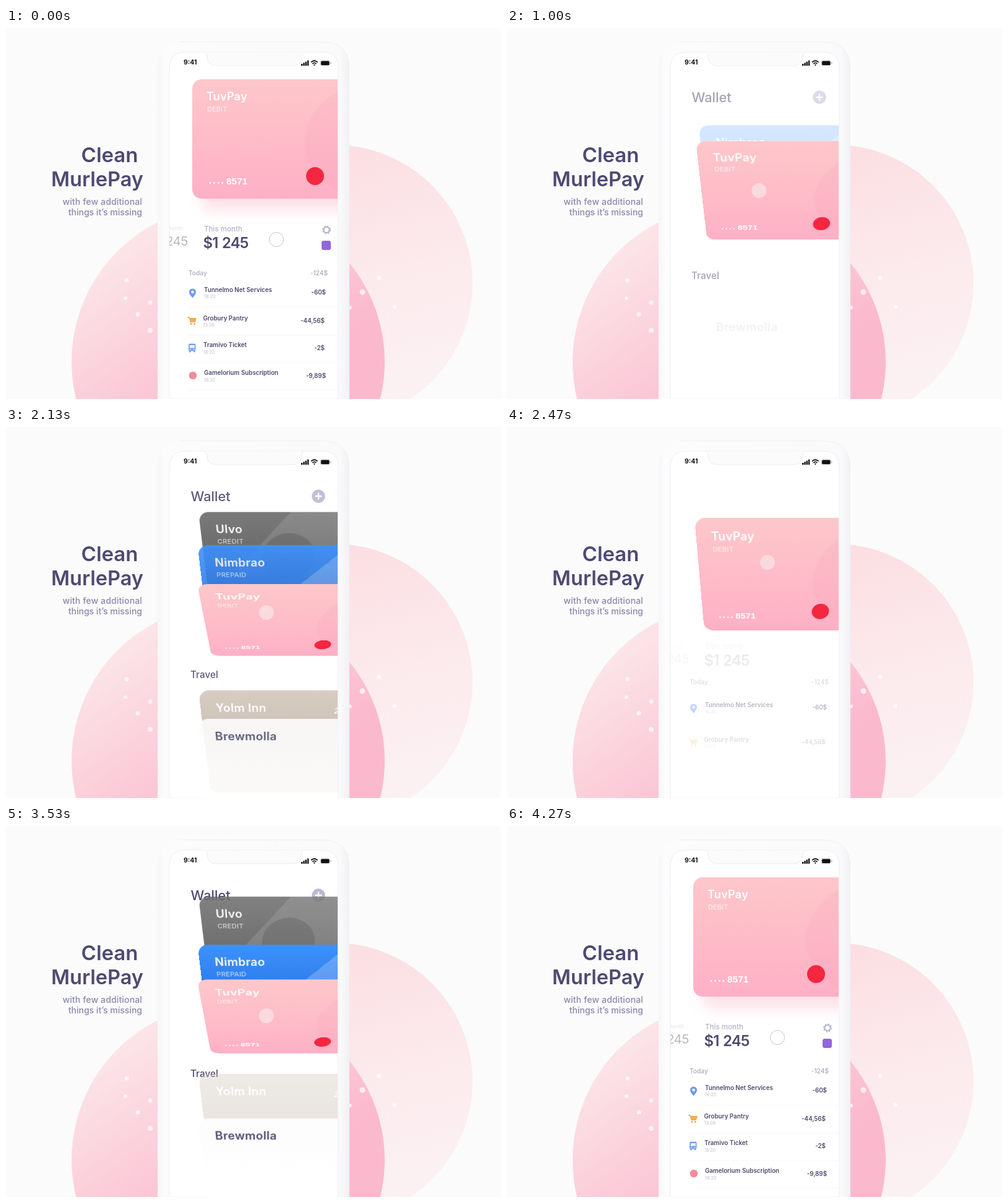
Animation of 800x600 px, one loop 4310 ms. Source, as an HTML page:

```html
<!DOCTYPE html>
<html lang="en">
<head>
<meta charset="utf-8">
<title>Wallet</title>
<style>
html, body { margin: 0; width: 100%; height: 100%; overflow: hidden; background: #fbfbfb; }
#stage { position: absolute; left: 0; top: 0; width: 800px; height: 600px; overflow: hidden; font-family: Inter, "Open Sans", sans-serif; }
#stage svg { position: absolute; left: 0; top: 0; overflow: visible; }
#screen { position: absolute; left: 264px; top: 39px; width: 272px; height: 561px; overflow: hidden; border-radius: 26px 26px 0 0; }
#ui { position: absolute; left: -264px; top: -39px; width: 800px; height: 600px; }
.text { position: absolute; line-height: 0; white-space: pre; }
.item { position: absolute; left: 0; top: 0; width: 800px; height: 600px; }
.card { position: absolute; left: 0; top: 0; width: 306px; height: 193px; border-radius: 15px; transform-origin: 0 0; overflow: hidden; }
.shadow { position: absolute; left: 317px; top: 200px; width: 290px; height: 76px; border-radius: 15px; box-shadow: 0 20px 22px rgba(250, 185, 202, .42); }
#pointer { position: absolute; left: -12px; top: -12px; width: 24px; height: 24px; border-radius: 50%; box-sizing: border-box; }
</style>
</head>
<body>
<div id="stage">
  <svg width="800" height="600">
    <defs>
      <linearGradient id="far" x1=".35" y1="0" x2=".6" y2="1">
        <stop offset="0" stop-color="#fbdde1"/><stop offset=".55" stop-color="#fcebed"/><stop offset="1" stop-color="#fbf2f4"/>
      </linearGradient>
      <linearGradient id="near" gradientUnits="userSpaceOnUse" x1="180" y1="350" x2="370" y2="620">
        <stop offset="0" stop-color="#fbe6e8"/><stop offset="1" stop-color="#fbb9cd"/>
      </linearGradient>
      <linearGradient id="body" x1="0" y1="0" x2="1" y2="0">
        <stop offset="0" stop-color="#f6f6f8"/><stop offset=".03" stop-color="#fcfcfd"/>
        <stop offset=".95" stop-color="#fafafb"/><stop offset="1" stop-color="#f1f1f4"/>
      </linearGradient>
    </defs>
    <circle cx="530" cy="413" r="224" fill="url(#far)"/>
    <circle cx="359" cy="540" r="253" fill="url(#near)"/>
    <g fill="#fff" fill-opacity=".7">
      <circle cx="576" cy="427" r="4.5"/><circle cx="233" cy="489" r="4"/><circle cx="213" cy="463" r="3.5"/>
      <circle cx="195" cy="408" r="3.5"/><circle cx="233" cy="444" r="3.5"/><circle cx="193" cy="437" r="3"/>
      <circle cx="556" cy="452" r="3"/><circle cx="603" cy="404" r="3.5"/><circle cx="628" cy="451" r="3"/>
    </g>
    <path d="M245 600V66Q245 22 289 22H511Q555 22 555 66V600Z" fill="url(#body)"/>
    <path d="M280 22.5H511Q554.5 22.5 554.5 66V600" fill="none" stroke="#f1f1f4"/>
    <path d="M264 600V65Q264 39 290 39H511Q537 39 537 65V600Z" fill="#fff" stroke="#eeeef1"/>
  </svg>
  <div id="screen"><div id="ui"></div></div>
  <svg width="800" height="600">
    <path d="M318 39Q325 39 325 46Q325 61 341 61H462Q478 61 478 46Q478 39 485 39Z" fill="#fbfbfc"/>
    <path d="M320 39.5Q325 40 325 46Q325 61 341 61H462Q478 61 478 46Q478 40 483 39.5" fill="none" stroke="#ededf0"/>
    <path d="M477 58h2.4v3h-2.4zM480.3 56.3h2.4v4.7h-2.4zM483.6 54.4h2.4v6.6h-2.4zM486.9 52.4h2.4v8.6h-2.4z" fill="#111"/>
    <g fill="none" stroke="#111" stroke-width="1.7">
      <path d="M493 55.4Q498.3 50.6 503.6 55.4M495.2 57.8Q498.3 55 501.4 57.8"/>
    </g>
    <path d="M496.7 59.3Q498.3 58 499.9 59.3L498.3 61.3Z" fill="#111"/>
    <rect x="508" y="52.5" width="15.5" height="8.5" rx="2.4" fill="#bbb"/>
    <rect x="509.2" y="53.6" width="13.2" height="6.3" rx="1.5" fill="#111"/>
    <rect x="524.2" y="55" width="1.2" height="3.4" rx=".6" fill="#aaa"/>
  </svg>
</div>
<script>
const $ = id => document.getElementById(id);
const stage = $('stage'), ui = $('ui');
const INK = '#4c4a6c', SOFT = '#a9a8bd', LOOP = 4310;

function add(parent, cls, css = {}, html = '') {
  const el = document.createElement('div');
  el.className = cls;
  el.innerHTML = html;
  Object.assign(el.style, css);
  parent.appendChild(el);
  return el;
}

// y is the middle of the capitals; align 'right' makes x the right end
function text(parent, str, x, y, size, weight, color, align, extra = {}) {
  const side = align === 'right' ? { right: parent.dataset.w - x + 'px' } : { left: x + 'px' };
  const el = add(parent, 'text', {
    top: y + 'px', fontSize: size + 'px', fontWeight: weight, color, ...side, ...extra
  });
  el.textContent = str;
}

function item(parent = ui) {
  const el = add(parent, 'item');
  el.dataset.w = 800;
  return el;
}

const svg = (el, inner) => el.insertAdjacentHTML('beforeend', `<svg width="800" height="600">${inner}</svg>`);

// Headline and clock
stage.dataset.w = 800;
text(stage, 'Clean', 213.5, 205, 33, 600, '#4d4a72', 'right');
text(stage, 'MurlePay', 222, 245, 32.5, 600, '#4d4a72', 'right');
text(stage, 'with few additional', 220, 281, 14, 500, '#8a88ad', 'right', { letterSpacing: '.15px' });
text(stage, 'things it’s missing', 220, 298, 14, 500, '#8a88ad', 'right');
text(stage, '9:41', 287, 56, 10.5, 700, '#111');

// Detail list
const month = item();
text(month, 'This month', 320, 324.5, 11.6, 500, '#b3b2c6');
text(month, '$1 245', 318.5, 347.5, 24, 600, INK, 'left', { letterSpacing: '-.9px', wordSpacing: '1.5px' });
text(month, '$1 245', 294, 345, 20.5, 400, '#b9b9c3', 'right', { letterSpacing: '-.5px' });
text(month, 'Last month', 286, 324, 9, 400, '#e2e2e8', 'right');

const tools = item();
svg(tools, `<circle cx="518" cy="326.5" r="4.6" fill="none" stroke="#b9b8cf" stroke-width="2.4"/>
  <circle cx="518" cy="326.5" r="6.2" fill="none" stroke="#b9b8cf" stroke-width="1.8" stroke-dasharray="2.43 2.43"/>
  <rect x="510" y="344" width="15" height="15" rx="3.5" fill="#9366da"/>`);

const today = item();
text(today, 'Today', 295, 395.5, 10.2, 500, SOFT);
text(today, '-124$', 520, 395.5, 10.2, 500, SOFT, 'right');

const icons = [
  `<path d="M301.5 436.5C298 432 296 430 296 427A5.5 5.5 0 0 1 307 427C307 430 305 432 301.5 436.5Z" fill="#6c97ee"/>
   <circle cx="301.5" cy="427" r="2.4" fill="#e8f0ff"/>`,
  `<path d="M293.5 467.5H296L298 475.5H305.5L307.3 469.5H296.5Z" fill="#f8ae4c" stroke="#f3a23c" stroke-linejoin="round"/>
   <circle cx="299" cy="478.6" r="1.4" fill="#e99b3e"/><circle cx="304.5" cy="478.6" r="1.4" fill="#e99b3e"/>`,
  `<rect x="295" y="510.5" width="11.5" height="12" rx="2" fill="#78a2f2"/><rect x="296.8" y="513" width="8" height="4.5" fill="#edf4ff"/>
   <path d="M296 522.5h2.4v1.8H296zM303.2 522.5h2.4v1.8h-2.4z" fill="#5f86d8"/>
   <path d="M297 520h2M302.6 520h2" stroke="#fff"/>`,
  `<circle cx="302" cy="562" r="6.3" fill="#f28c98"/>`
];
const rows = [
  ['Tunnelmo Net Services', '18:20', '-60$', 320, 424, 435, 428, 517],
  ['Grobury Pantry', '13:09', '-44,56$', 318.5, 469.5, 481, 474, 515],
  ['Tramivo Ticket', '18:20', '-2$', 319, 513, 524.5, 517.5, 515],
  ['Gamelorium Subscription', '18:20', '-9,89$', 320, 558, 569.5, 562.5, 517]
].map(([name, time, sum, x, y, ty, sy, end], i) => {
  const el = item();
  text(el, name, x, y, 9.8, 600, INK);
  text(el, time, x, ty, 7.2, 400, '#bcbbc9');
  text(el, sum, end, sy, 9.8, 600, INK, 'right');
  svg(el, icons[i] + `<path d="M294 ${452 + 44.5 * i}H536" stroke="#f7f7f9"/>`);
  return el;
});

// Wallet headings
const title = item();
text(title, 'Wallet', 298.5, 111.5, 21.8, 500, INK);
svg(title, `<circle cx="505" cy="112" r="10.7" fill="#b9b9d4"/>
  <path d="M499.5 112H510.5M505 106.5V117.5" stroke="#fff" stroke-width="2.4"/>`);
const travel = item();
text(travel, 'Travel', 298, 400.5, 15.3, 500, INK);

// Cards
function card(name, kind, background, color = '#fff') {
  const el = add(ui, 'card', { background });
  el.dataset.w = 306;
  text(el, name, 23, 28, 18, 600, color, 'left', { letterSpacing: '.3px' });
  text(el, kind, 24, 48.5, 10.8, 500, 'rgba(255,255,255,.68)', 'left', { letterSpacing: '.2px' });
  return el;
}

const dark = card('Ulvo', 'CREDIT', 'linear-gradient(130deg, transparent 29%, rgba(255,255,255,.12) 29%), linear-gradient(#6a6a6a, #585858 40%, #4c4c4c)');
add(dark, '', { position: 'absolute', left: '93px', top: '34px', width: '84px', height: '84px', borderRadius: '50%', background: 'rgba(30,30,30,.22)' });
const blue = card('Nimbrao', 'PREPAID', 'linear-gradient(137deg, transparent 43.7%, rgba(255,255,255,.22) 43.7%), linear-gradient(#3c92fd, #2f7ae8 38%)');
const shadow = add(ui, 'shadow');
const pink = card('TuvPay', 'DEBIT', 'radial-gradient(ellipse 130px 100px at 310px 100px, rgba(247,150,178,.14) 97%, transparent 100%), linear-gradient(#fdc7ca, #feb0c6)');
text(pink, '....', 26, 162.5, 18, 700, '#fff', 'left', { letterSpacing: '.6px' });
text(pink, '8571', 55, 165, 15.5, 700, '#fff', 'left', { fontFamily: '"Liberation Sans", Arial, sans-serif' });
add(pink, '', { position: 'absolute', left: '183.5px', top: '141.5px', width: '29px', height: '29px', borderRadius: '50%', background: '#f5263f' });
const tan = card('Yolm Inn', '', 'linear-gradient(#d2c6bb, #c9bdb2 30%, #c4b8ad)');
text(tan, '25', 203, 32, 13, 500, '#fff', 'left', { fontStyle: 'italic' });
const pale = card('Brewmolla', '', 'linear-gradient(#fcfcfc, #fff 50%)', INK);
const pointer = add(stage, '');
pointer.id = 'pointer';

const POWER = 2.5;
const clamp = x => Math.max(0, Math.min(1, x));
const ramp = (t, from, to) => clamp((t - from) / (to - from));
function ease(x, p = 2) {
  x = clamp(x);
  return x < .5 ? (2 * x) ** p / 2 : 1 - (2 - 2 * x) ** p / 2;
}

// Piecewise linear lookup in a list of [position, ...values]
function track(keys, p) {
  let i = 1;
  while (i < keys.length - 1 && p > keys[i][0]) i++;
  const a = keys[i - 1], b = keys[i], f = ramp(p, a[0], b[0]);
  return a.slice(1).map((v, n) => v + (b[n + 1] - v) * f);
}

// Tilt in perspective: left corners plus the scale of the top and bottom edges
function tilt(el, x0, y0, x1, y1, s0, s1) {
  const k = s0 / s1, h = 193;
  const m = [s0, 0, 0, 0, (x1 * k - x0) / h, (y1 * k - y0) / h, 0, (k - 1) / h, 0, 0, 1, 0, x0, y0, 0, 1];
  el.style.transform = `matrix3d(${m.map(v => v.toFixed(7)).join()})`;
}

function place(el, dy, alpha) {
  el.style.transform = `translateY(${dy.toFixed(2)}px)`;
  show(el, alpha);
}

function show(el, alpha) {
  el.style.opacity = clamp(alpha).toFixed(3);
  el.style.visibility = alpha > 0 ? 'visible' : 'hidden';
}

// tilt amount: left-top x, y, left-bottom x, y
const pose = [
  [0, 301, 83, 301, 276], [.1, 301.5, 97, 305, 290], [.31, 302, 116, 311, 308],
  [.585, 303, 148, 319, 329], [1, 309, 254, 332, 370]
];
// time: x, y, pressed
const path = [
  [0, 437, 342, 0], [90, 437, 342, 0], [300, 421, 252, 0], [500, 408, 184, 0], [590, 408, 185, 1], [770, 408, 199, 1],
  [870, 408, 228, 1], [1080, 407, 284, 1], [1290, 407, 302, 1], [1500, 407, 302, 1],
  [1600, 408, 302, 0], [1950, 421, 300, 0], [2130, 421, 300, 1], [2230, 421, 296, 1],
  [2470, 421, 219, 1], [2620, 420, 205, 0], [2850, 419, 203, 0], [2950, 419, 203, 1],
  [3130, 419, 217, 1], [3230, 419, 241, 1], [3440, 420, 293, 1], [3530, 421, 307, 1],
  [3690, 421, 308, 1], [3800, 421, 308, 0], [4200, 437, 342, 0], [LOOP, 437, 342, 0]
];

function draw(t) {
  const [shut, open] = t < 2800 ? [590, 2210] : [2950, 3690];
  const k = t - shut, o = t - open;
  const q = ease(k / 680, POWER) * (1 - ease(o / 560, POWER));

  // Main card
  tilt(pink, ...track(pose, q), 1 + .143 * q, 1 - .115 * q);
  show(shadow, 1 - q * 4);
  shadow.style.transform = `translateY(${q * 110}px)`;

  // List: pulled down and thinned out on closing, raised in turn on opening
  const pull = 482 * q ** 1.55, fade = 1 - ramp(q, .08, .62);
  const list = (el, lag, rise, stretch, thin) => {
    if (o > 0) {
      const v = ramp(o, 180 + lag, 380 + lag);
      place(el, rise * (1 - v), v);
    } else {
      place(el, pull * (1 + stretch), fade - thin * clamp(q * 10));
    }
  };
  list(month, 60, 34, 0, 0);
  list(tools, 110, 34, 0, q * 3);
  list(today, 0, 27, -.03, 0);
  rows.forEach((el, i) => list(el, 45 * i, 44, .04 + .24 * i, .15 * i));

  // Wallet parts arrive in turn and leave upwards together
  const gone = ramp(o, -100, 110);
  const leave = 60 * gone * gone;
  const part = (el, from, to, drop, x, y) => {
    const top = y - drop * (1 - ease((k - from) / (to - from))) - leave;
    tilt(el, x, top, x + 20, top + 165, 1.1, .9);
  };
  const out = 1 - gone;
  show(title, ramp(k, 320, 500) * out);
  show(travel, ramp(k, 320, 500) * out);
  part(dark, 450, 720, 45, 311, 138);
  show(dark, ramp(k, 470, 600) * out);
  part(blue, 360, 560, 40, 309.5, 192);
  show(blue, ramp(k, 380, 520) * out);
  part(tan, 500, 760, 32, 311, 427);
  show(tan, ramp(k, 520, 680) * out);
  part(pale, 360, 560, 20, 310, 473);
  show(pale, ramp(k, 400, 540) * out);

  // Pointer
  const [x, y, press] = track(path, t);
  pointer.style.transform = `translate(${x}px, ${y}px)`;
  pointer.style.background = `rgba(247,240,243,${.55 * press})`;
  pointer.style.border = `1.3px solid rgba(190,190,198,${.9 * (1 - press)})`;
}

const start = performance.now();
function frame() {
  draw((performance.now() - start) % LOOP);
  requestAnimationFrame(frame);
}
frame();
</script>
</body>
</html>
```
